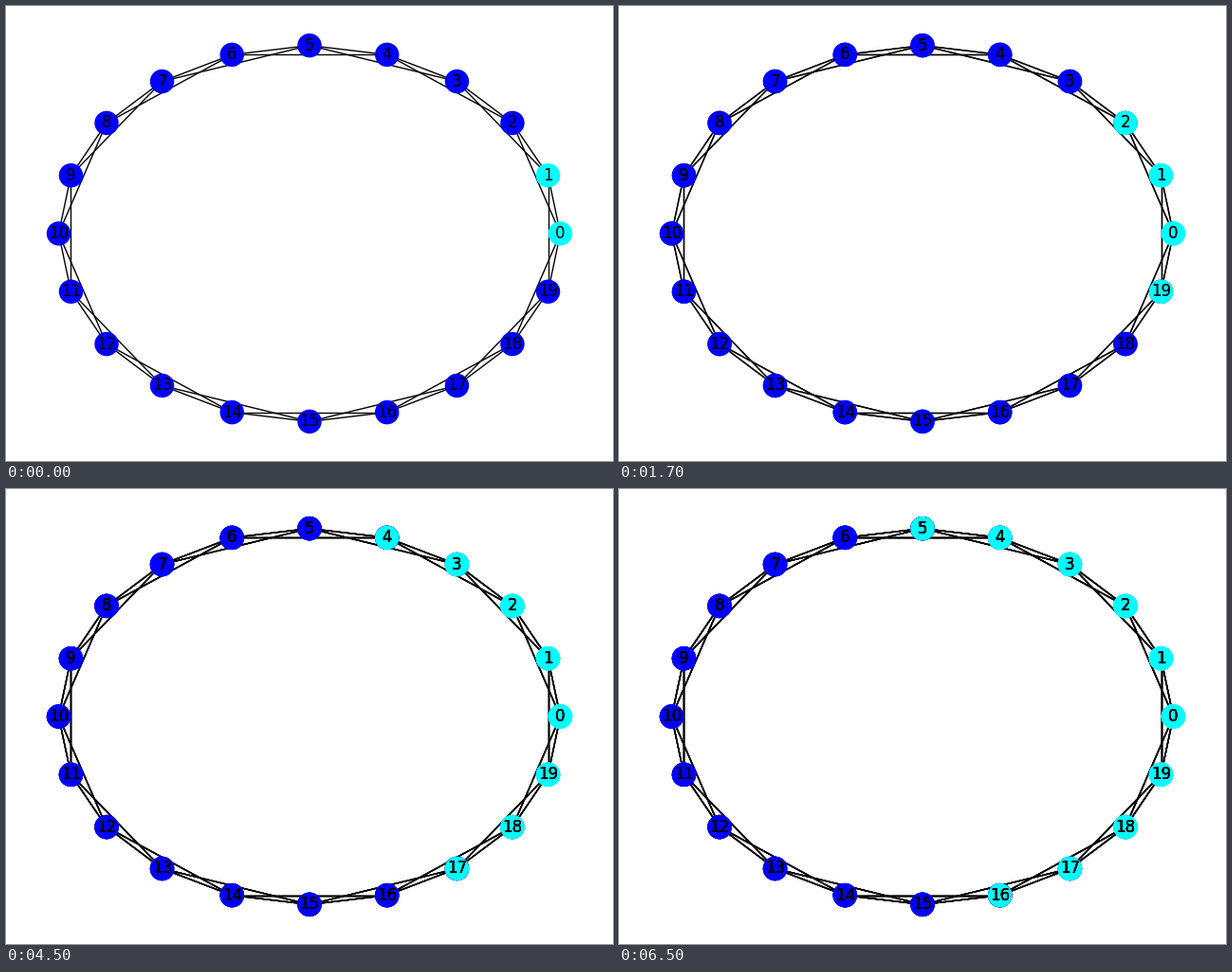
Write a matplotlib script that moves like this. It is 640 by 480 pixels and loops after 8000 ms.

```python
import numpy as np
import matplotlib.pyplot as plt
from matplotlib.animation import FuncAnimation
from matplotlib.collections import LineCollection

NODES = 20
STEPS = 5
INTERVAL = 500
FRAMES = 16
HALF_SPAN = 1.1 ** 2  # unit circle with two 5% margins

fig = plt.figure(figsize=(6.4, 4.8), dpi=100, facecolor="white")
ax = fig.add_axes((0, 0, 1, 1))
ax.set_axis_off()

angles = 2 * np.pi * np.arange(NODES) / NODES
points = np.column_stack((np.cos(angles), np.sin(angles)))
edges = [(points[i], points[(i + hop) % NODES])
         for i in range(NODES) for hop in (1, 2)]


def is_reached(node, step):
    """The spread starts at 0 and 1 and gains one node each way per step."""
    return node <= step + 1 or node >= NODES - step


def draw_layer(step):
    lines = LineCollection(edges, colors="black", linewidths=1.0,
                           antialiaseds=(1,), zorder=1)
    ax.add_collection(lines)
    colors = ["cyan" if is_reached(n, step) else "blue" for n in range(NODES)]
    dots = ax.scatter(*points.T, s=300, c=colors, marker="o", zorder=2)
    labels = [ax.text(x, y, str(n), size=12, color="black", family="DejaVu Sans",
                      ha="center", va="center", clip_on=True)
              for n, (x, y) in enumerate(points)]
    return [lines, dots, *labels]


# Each step is painted over the earlier ones, so strokes grow denser.
layers = [draw_layer(step) for step in range(STEPS)]
ax.set_xlim(-HALF_SPAN, HALF_SPAN)
ax.set_ylim(-HALF_SPAN, HALF_SPAN)


def update(frame):
    step = (frame + 3) // 4
    for index, layer in enumerate(layers):
        for artist in layer:
            artist.set_visible(index <= step)
    return [artist for layer in layers for artist in layer]


anim = FuncAnimation(fig, update, frames=FRAMES, interval=INTERVAL,
                     repeat=True, repeat_delay=0, blit=False)
plt.show()
```
